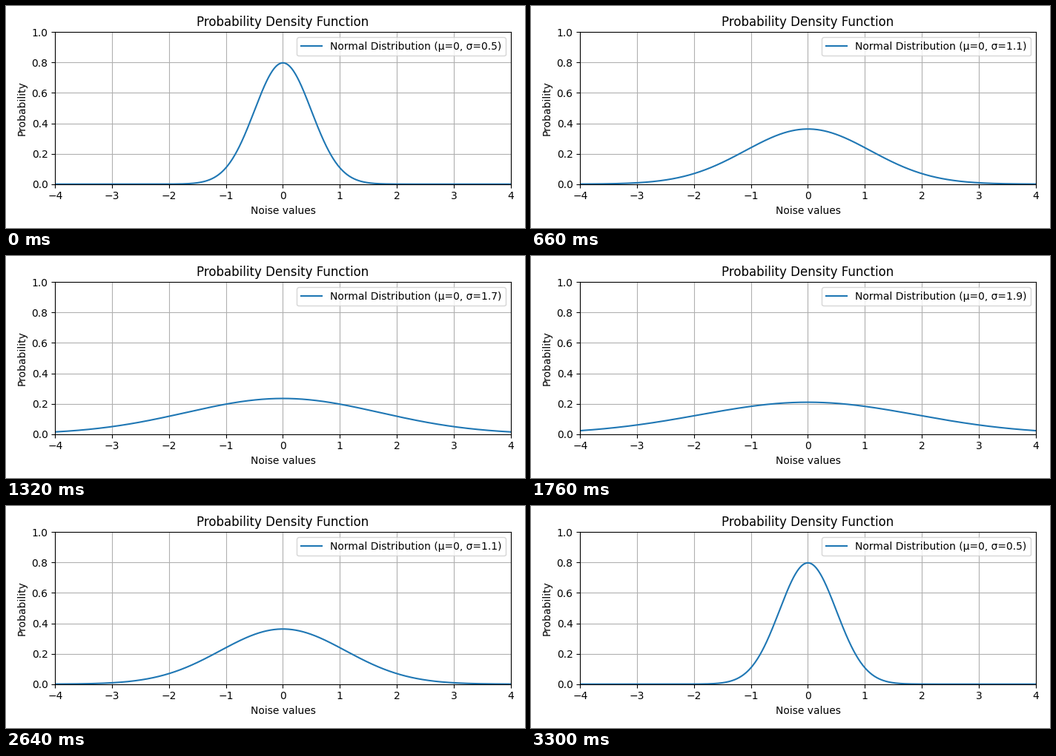
A matplotlib script for the animation above (3.41 s loop, 700 px wide and 300 px high).

```python
import numpy as np
import matplotlib.pyplot as plt
from matplotlib.animation import FuncAnimation

plt.rcParams.update({"font.family": "DejaVu Sans",
                     "text.hinting": "force_autohint"})

FRAMES = 31
INTERVAL = 110
MU = 0
TOP, BOTTOM = 35.33, 240.72  # axes edges in pixels from the top
x = np.linspace(-4, 4, 1000)


def sigma_at(i):
    """Spread rises from 0.5 to 2.0 and falls back in steps of 0.1."""
    return 0.5 + 0.1 * min(i, FRAMES - 1 - i)


def pdf(sigma):
    return np.exp(-0.5 * ((x - MU) / sigma) ** 2) / (sigma * np.sqrt(2 * np.pi))


def label(sigma):
    return f"Normal Distribution (μ={MU}, σ={sigma:.1f})"


fig, ax = plt.subplots(figsize=(7, 3), dpi=100)
line, = ax.plot(x, pdf(sigma_at(0)), label=label(sigma_at(0)))
ax.set(xlim=(-4, 4), ylim=(0, 1), title="Probability Density Function",
       xlabel="Noise values", ylabel="Probability")
ax.grid(True)
legend_text = ax.legend(loc="upper right").get_texts()[0]
fig.tight_layout()
fig.subplots_adjust(top=1 - TOP / 300, bottom=1 - BOTTOM / 300)


def update(i):
    sigma = sigma_at(i)
    line.set_ydata(pdf(sigma))
    legend_text.set_text(label(sigma))
    return line, legend_text


anim = FuncAnimation(fig, update, frames=FRAMES, interval=INTERVAL, repeat=True)
plt.show()
```
